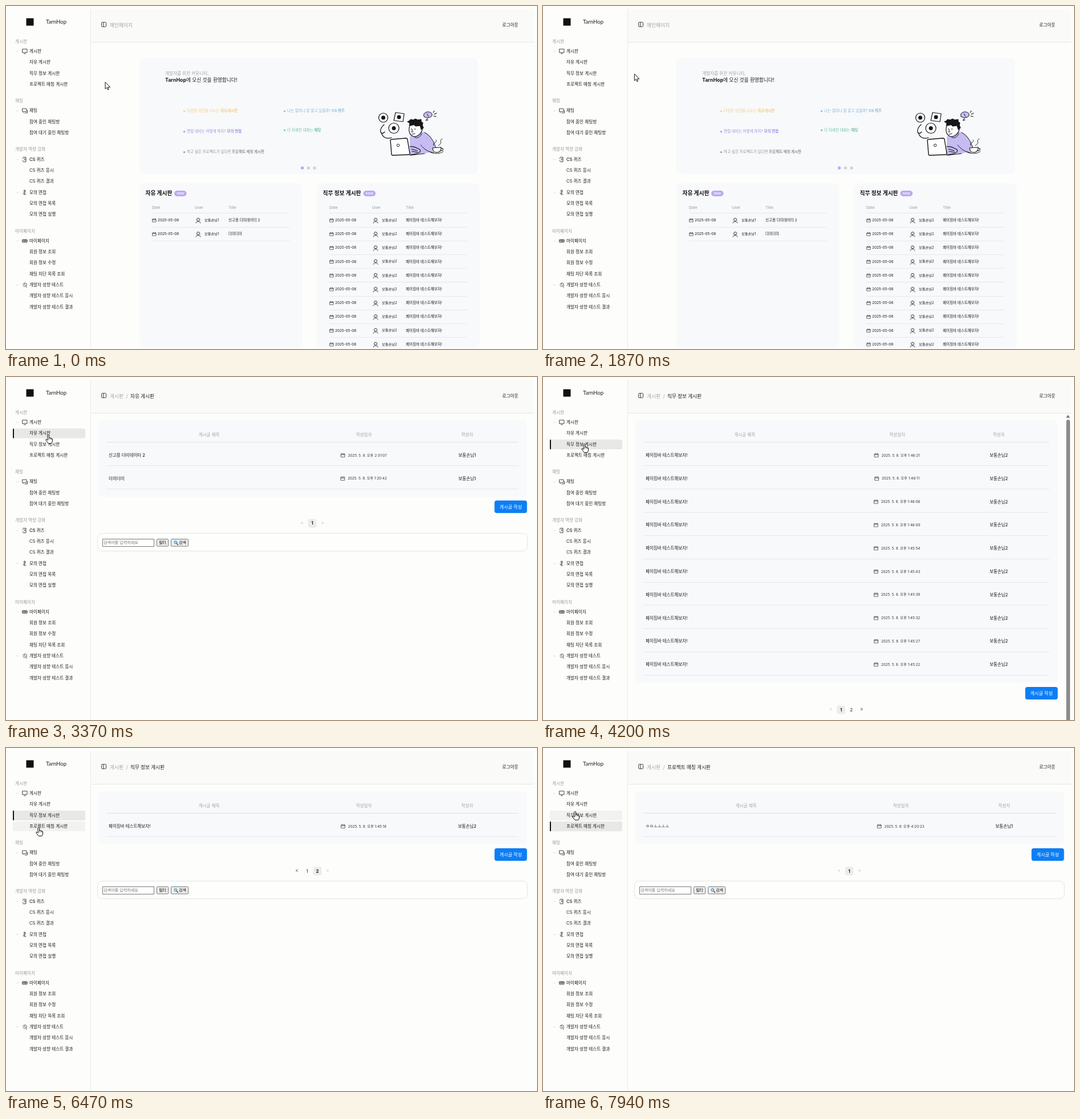
Recreate the animation shown at these times as an HTML page with a canvas. Size 931 by 602 pixels, loop 8 s.

```html
<!DOCTYPE html>
<html lang="ko">
<head>
<meta charset="utf-8">
<title>TarnHop</title>
<style>
html, body { margin: 0; width: 100%; height: 100%; overflow: hidden; background: #fdfdfc; }
canvas { display: block; width: 931px; height: 602px; }
</style>
</head>
<body>
<canvas id="stage"></canvas>
<script>
const W = 931, H = 602, LOOP = 8000;
const canvas = document.getElementById('stage');
const dpr = window.devicePixelRatio || 1;
canvas.width = W * dpr;
canvas.height = H * dpr;
const ctx = canvas.getContext('2d');

const SANS = 'Inter, "Noto Sans CJK KR", "Noto Sans CJK", "Noto Sans", sans-serif';
const INK = '#1c1c1c', GRAY = '#a5a5a1', LINE = '#e4e8ef', PANEL = '#f7f9fb', LILAC = '#bcaaf0';
const BRAND = 'TarnHop', USER = '보통손님', TEST = '페이징바 테스트해보자!';

// Drawing helpers
function text(s, x, y, size, color = INK, weight = 400, align = 'left', family = SANS) {
  ctx.font = `${weight} ${size}px ${family}`;
  ctx.fillStyle = color;
  ctx.textAlign = align;
  ctx.fillText(s, x, y);
  return ctx.measureText(s).width;
}

function box(x, y, w, h, r, fill, stroke) {
  ctx.beginPath();
  ctx.roundRect(x, y, w, h, r);
  if (fill) { ctx.fillStyle = fill; ctx.fill(); }
  if (stroke) { ctx.strokeStyle = stroke; ctx.lineWidth = 1; ctx.stroke(); }
}

function dot(x, y, r, fill, stroke, width = 1) {
  ctx.beginPath();
  ctx.arc(x, y, r, 0, 7);
  if (fill) { ctx.fillStyle = fill; ctx.fill(); }
  if (stroke) { ctx.strokeStyle = stroke; ctx.lineWidth = width; ctx.stroke(); }
}

function shape(d, x, y, fill, stroke, width = 1) {
  const p = new Path2D(d);
  ctx.save();
  ctx.translate(x, y);
  ctx.lineCap = ctx.lineJoin = 'round';
  if (fill) { ctx.fillStyle = fill; ctx.fill(p); }
  if (stroke) { ctx.strokeStyle = stroke; ctx.lineWidth = width; ctx.stroke(p); }
  ctx.restore();
}

function rule(x1, x2, y, color = LINE) {
  ctx.fillStyle = color;
  ctx.fillRect(x1, Math.round(y), x2 - x1, 1);
}

function calendar(x, y, s) {
  shape(`M0 1H${s}V${s}H0ZM0 ${s * .4}H${s}M${s * .25} 0V1M${s * .75} 0V1`, x, y - s / 2, null, '#444', .8);
}

// Sidebar
const ICONS = {
  board: 'M0 0H8V6H0ZM2.5 8H5.5',
  chat: 'M0 0H7V5H3L1 6.5V5H0ZM8.5 3V7.5H4',
  quiz: 'M1 0H6V8H1M3 2.5H5M3 4.5H5M0 2H1M0 6H1',
  talk: 'M3 0H5V2.5H3ZM4 3V5L2 7.5H6M1 5H4',
  card: 'M0 1.5H8V6H0ZM0 3.5H8M2.7 1.5V6M5.4 1.5V6',
  trait: 'M1 3A3.2 3.2 0 1 1 5.5 6.5L7.5 8M3 2L5 5M1 5L4 7'
};
const MENU = [
  ['게시판', ['board', '게시판', '자유 게시판', '직무 정보 게시판', '프로젝트 매칭 게시판']],
  ['채팅', ['chat', '채팅', '참여 중인 채팅방', '참여 대기 중인 채팅방']],
  ['개발자 역량 강화', ['quiz', 'CS 퀴즈', 'CS 퀴즈 응시', 'CS 퀴즈 결과'],
    ['talk', '모의 면접', '모의 면접 목록', '모의 면접 실행']],
  ['마이페이지', ['card', '마이페이지', '회원 정보 조회', '회원 정보 수정', '채팅 차단 목록 조회'],
    ['trait', '개발자 성향 테스트', '개발자 성향 테스트 응시', '개발자 성향 테스트 결과']]
];
const rows = [];
let menuY = 62.5;
for (const [label, ...groups] of MENU) {
  rows.push({ label, y: menuY, kind: 'section' });
  menuY += 17.2;
  for (const [icon, head, ...items] of groups) {
    rows.push({ label: head, y: menuY, kind: 'group', icon });
    for (const label of items) rows.push({ label, y: menuY += 19.3, kind: 'item' });
    menuY += 19.3;
  }
  menuY += 10.1;
}

const rowAt = ([x, y]) =>
  x > 12 && x < 139 ? rows.find(r => r.kind === 'item' && Math.abs(r.y - y) < 8.8) : undefined;

function sidebar(active, hovered) {
  box(35.5, 21.5, 13, 13, 0, '#111');
  text(BRAND, 70, 28.5, 9.6, INK, 400, 'left', 'Lato, sans-serif');
  for (const r of rows) {
    const on = r.label === active && r.kind === 'item';
    if (on || r === hovered) box(12, r.y - 8.6, 127, 17.2, 3, on ? '#e8e8e7' : '#f2f2f0');
    if (on) box(12, r.y - 8.6, 2, 17.2, 1, '#111');
    if (r.kind === 'section') text(r.label, 16, r.y, 7.6, '#9b9b98');
    else text(r.label, 41, r.y, 7.6, INK, r.kind === 'group' || on ? 500 : 400);
    if (r.icon) {
      shape('M0 0L2 2L4 0', 18, r.y - 1, null, '#d5d5d5', .8);
      shape(ICONS[r.icon], 29, r.y - 4, null, '#333', .9);
    }
  }
}

function header(active) {
  box(149, 5, 777, 58, 0, '#fafaf8');
  rule(149, 926, 62.5, '#e6e6e2');
  ctx.fillStyle = '#e9e9ea';
  ctx.fillRect(148, 5, 1, 597);
  box(167.5, 28.5, 8, 8, 1, null, '#444');
  shape('M0 0V8', 170.5, 28.5, null, '#444');
  if (active) {
    text('게시판', 182, 34, 8.7, GRAY);
    text('/', 212, 34, 8.7, GRAY, 400, 'center');
    text(active, 218, 34, 8.6, INK, 500);
  } else text('메인페이지', 182, 34, 8.7, GRAY);
  text('로그아웃', 870, 33.5, 7.6, INK, 500);
}

// Main page
const TIPS = [
  [311, 184.5, '#f4cb7c', '다양한 의견을 나누는 ', '자유게시판'],
  [311, 220.5, '#9c8de0', '면접 대비는 어떻게 하지? ', '모의 면접'],
  [311, 256.5, '#92929a', '하고 싶은 프로젝트가 있다면 ', '프로젝트 매칭 게시판'],
  [487, 184.5, '#82b8d8', '나는 얼마나 잘 알고 있을까? ', 'CS 퀴즈'],
  [487, 218, '#6cc2a2', '더 자세한 대화는 ', '채팅']
];

function drawing() {
  const pen = (d, fill, w = 1.2) => shape(d, 0, 0, fill, '#161616', w);
  // floating cards
  dot(661.5, 196, 8, '#fff', '#161616', 1.2);
  dot(661.5, 196, 3.5, '#161616');
  pen('M683 187L698 189L696 203L680 201Z', '#fff');
  dot(689, 195, 3.5, '#161616');
  dot(680, 214.5, 9, '#fff', '#161616', 1.2);
  dot(680, 214.5, 3.5, '#161616');
  pen('M663 208C653 217 656 229 664 221M658 222C660 231 668 234 676 231');
  // idea bulb
  pen('M733 194C729 185 745 183 747 190C748 196 738 198 733 194ZM739 197L736 201L740 200M738 189L741 194', '#c9bdf3', 1);
  pen('M749 187L751 184M751 190L755 188M750 193L754 194', null, 1.1);
  // body and head
  shape('M708 230C714 221 724 220 733 221C746 226 751 240 754 252C741 260 722 260 708 260Z', 0, 0, '#c6bcf2');
  pen('M734 222C746 228 752 242 755 253M727 244C734 252 741 257 750 257', null, 1);
  pen('M708 210C705 218 707 227 715 229C721 230 728 225 730 216L729 206Z', '#fff');
  pen('M704 203L708 201L709 199L714 200L718 198L722 200L728 199L728 203L731 205L730 209L732 214L728 217L726 210L718 211L715 208L707 210L708 206Z', '#161616', 1);
  pen('M711 215V217M717 215V217M713 217L711 221L714 221M712 225L717 224M716 230C721 234 727 229 729 224', null, 1);
  // laptop and hands
  pen('M674 236Q674 234 677 234L701 232Q704 232 704 235L708 259Q708 261 705 261L678 262Q676 262 676 260Z', '#fff', 1.4);
  dot(687.5, 244.5, 2.2, null, '#161616');
  pen('M708 247C714 245 720 249 726 252C728 256 724 260 709 261M711 251L721 254M712 255L722 257M708 262L734 259', null, 1.1);
  // cup
  pen('M748 249L763 248C763 255 759 257 755 257C751 257 748 254 748 249ZM763 250C768 249 767 254 762 254', '#fff', 1.1);
  pen('M743 256C748 260 763 260 767 255M750 245C746 239 758 240 754 235M758 245C768 239 757 237 765 233', null, .9);
}

function listCard(x, title, pillX, posts) {
  box(x, 311, 285.5, 289, 10, PANEL);
  text(title, x + 10.5, 329.5, 9.7, '#111', 700);
  box(pillX, 324, 21.5, 10, 5, LILAC);
  text('new', pillX + 10.7, 329.2, 6.5, '#fff', 500, 'center');
  const left = x + 22;
  ['Date', 'User', 'Title'].forEach((s, i) => text(s, left + [0, 75, 134][i], 354.5, 6.6, '#a3a3a6', 500));
  rule(left, left + 241, 363);
  posts.forEach(([title, user], i) => {
    const y = 376 + i * 24.2;
    calendar(left + 1, y, 6);
    text('2025-05-08', left + 10, y, 6.4);
    dot(left + 81, y, 5.3, '#eceef2');
    dot(left + 81, y - 1, 2.5, null, '#333', .9);
    shape('M-4 0C-3 -4 3 -4 4 0', left + 81, y + 5, null, '#333', .9);
    text(user, left + 92, y, 6.2, INK);
    text(title, left + 134, y, 6.5, INK);
    if (y < 590) rule(left, left + 241, y + 11.5);
  });
}

function mainPage() {
  box(233.5, 91, 594, 204, 10, PANEL);
  text('개발자를 위한 커뮤니티,', 279, 118.5, 7.6, '#a3a3a3');
  const w = text(BRAND, 279, 130, 8.8, INK, 700);
  text('에 오신 것을 환영합니다!', 279 + w, 130, 8.7, INK, 500);
  for (const [x, y, color, lead, bold] of TIPS) {
    dot(x + 1.5, y, 1.5, color);
    const lw = text(lead, x + 6, y, 6.5, color);
    text(bold, x + 6 + lw, y, 6.5, color, 700);
  }
  [519.5, 530.5, 541].forEach((x, i) => dot(x, 284.3, 2.7, i ? '#d3d3d6' : LILAC));
  drawing();
  listCard(234, '자유 게시판', 295, [['신고용 더미데이터 2', USER + 1], ['더미더미', USER + 1]]);
  ctx.save();
  ctx.beginPath();
  ctx.rect(0, 0, W, 600);
  ctx.clip();
  listCard(545, '직무 정보 게시판', 626.5, Array(10).fill([TEST, USER + 2]));
  ctx.restore();
}

// Board pages
const FREE = '자유 게시판', JOB = '직무 정보 게시판', MATCH = '프로젝트 매칭 게시판';
const posts = (title, user, times) => times.split(' ').map(t => [title, user, '2025. 5. 8. 오후 ' + t]);
const freePosts = [
  ...posts('신고용 더미데이터 2', USER + 1, '2:31:07'),
  ...posts('더미더미', USER + 1, '1:20:42')
];
const jobPosts = posts(TEST, USER + 2,
  '1:46:21 1:46:11 1:46:06 1:46:00 1:45:54 1:45:43 1:45:39 1:45:32 1:45:27 1:45:22');
const jobLast = posts(TEST, USER + 2, '1:45:14');
const matchPosts = posts('ㅇㅇㅗㅗㅗㅗ', USER + 1, '4:20:23');

// start, menu entry, posts (null while loading), page count, current page
const SCENES = [
  [0, null],
  [2950, FREE, null, 1, 1],
  [3050, FREE, freePosts, 1, 1],
  [3950, JOB, null, 1, 1],
  [4050, JOB, jobPosts, 2, 1],
  [5370, JOB, null, 2, 1],
  [5480, JOB, jobLast, 2, 2],
  [7150, MATCH, null, 1, 1],
  [7250, MATCH, matchPosts, 1, 1]
];

function searchBar(y, right) {
  box(160.5, y + .5, right - 160, 31, 8, '#fefefd', '#e4e4df');
  box(169.5, y + 10.5, 90, 13, 0, '#fff', '#777');
  text('검색어를 입력하세요', 171, y + 16.5, 7.1, '#777');
  box(264.5, y + 10.5, 20, 12.5, 1, '#efefef', '#777');
  text('필터', 274.5, y + 17, 7.1, '#111', 400, 'center');
  box(289.5, y + 10.5, 30, 12.5, 1, '#efefef', '#777');
  shape('M2 2L4.5 4.5', 297, y + 16, null, '#444', 1.4);
  dot(297.3, y + 16, 2.4, '#a8dcf4', '#2f78a8', .9);
  text('검색', 303, y + 17, 7.1, '#111');
}

function boardPage(list, pages, page, hoverNext) {
  const scroll = list && list.length > 5;
  const right = scroll ? 902.5 : 913.5;
  const cols = scroll ? [353.5, 621, 799] : [356, 627.5, 808.5];
  const bottom = list ? 128 + list.length * 40.9 : 146;
  box(161.5, 76, right - 161.5, bottom - 76, 8, PANEL);
  ['게시글 제목', '작성일자', '작성자'].forEach((s, i) => text(s, cols[i], 102, 7.5, GRAY, 400, 'center'));
  rule(176, right - 15, 113.5, '#dde2ea');
  if (!list) text('로딩 중입니다...', 175, 126.5, 8.6, INK);
  else list.forEach(([title, user, date], i) => {
    const y = 137.7 + i * 40.8;
    text(title, 180, y, 7.5, INK, 500);
    ctx.font = `400 6.3px ${SANS}`;
    const x = cols[1] - (ctx.measureText(date).width + 12) / 2;
    calendar(x, y - .5, 6.5);
    text(date, x + 12, y, 6.3, '#333');
    text(user, cols[2], y, 7.5, INK, 500, 'center');
    rule(176, right - 15, 155 + i * 40.9);
  });
  box(right - 57, bottom + 7, 57, 22, 4, '#0d7ef5');
  text('게시글 작성', right - 28.5, bottom + 18.3, 8.1, '#fff', 500, 'center');

  const py = bottom + 47, mid = scroll ? 531.7 : 537;
  for (let i = 0; i <= pages + 1; i++) {
    const x = mid + (i - (pages + 1) / 2) * 18;
    if (i === page || (hoverNext && i === page + 1)) box(x - 7.2, py - 7.5, 14.4, 15, 3, '#ececea');
    if (i > 0 && i <= pages) text(i, x, py + .3, 7.8, INK, i === page ? 700 : 400, 'center');
    else {
      const off = i ? page === pages : page === 1;
      text(i ? '>' : '<', x, py, 8, off ? '#bdbdbd' : '#222', 400, 'center');
    }
  }
  searchBar(Math.round(bottom + 64.5), right);
  if (scroll) {
    box(916, 64, 10, 538, 0, '#fbfbfb');
    shape('M0 5L3.5 0L7 5Z', 917, 66.5, '#777');
    box(917.5, 75, 6.5, 540, 3.2, '#8a8a8a');
  }
}

// Pointer
const PATH = [
  [0, 174, 134], [300, 174, 134], [900, 171, 133], [1300, 171, 133], [2500, 148, 104],
  [2600, 77, 101], [2900, 74, 100], [3300, 74, 100], [3800, 72, 117], [4350, 72, 117],
  [5250, 541, 584], [5550, 541, 584], [6350, 57, 139], [7250, 57, 139], [7850, 56, 111], [LOOP, 56, 111]
];

function pointerAt(t) {
  t = Math.max(0, t);
  let i = 1;
  while (i < PATH.length - 1 && PATH[i][0] < t) i++;
  const [t0, x0, y0] = PATH[i - 1], [t1, x1, y1] = PATH[i];
  const k = Math.min(1, (t - t0) / (t1 - t0)), e = k * k * (3 - 2 * k);
  return [x0 + (x1 - x0) * e, y0 + (y1 - y0) * e];
}

function pointer([x, y], hand) {
  if (hand) {
    shape('M-1 1Q0 -1 1.5 1V6L3 5.5L5 6.5L6.5 7L7.5 8V12L6 15.5H0L-4 10Q-4.5 8 -2.5 8.5L-1 10Z', x, y, '#fff', '#111', 1);
    shape('M1.5 6V8.5M4 6.5V8.5M6 7V9', x, y, null, '#111', .7);
  } else shape('M0 0V11.5L2.7 9L4.5 13L6.3 12.2L4.6 8.4H8.2Z', x, y, '#fff', '#111', 1);
}

function render(t) {
  ctx.setTransform(dpr, 0, 0, dpr, 0, 0);
  ctx.textBaseline = 'middle';
  ctx.fillStyle = '#fdfdfc';
  ctx.fillRect(0, 0, W, H);
  const [, active, list, pages, page] = SCENES.filter(s => s[0] <= t).pop();
  const pos = pointerAt(t), hovered = rowAt(pos);
  const overNext = pages === 2 && page === 1 && Math.hypot(pos[0] - 541, pos[1] - 584) < 8;
  header(active);
  sidebar(active, hovered);
  if (active) boardPage(list, pages, page, overNext);
  else mainPage();
  const settled = hovered && rowAt(pointerAt(t - 120));
  pointer(pos, settled || (overNext && list));
}

const start = performance.now();
function tick() {
  render((performance.now() - start) % LOOP);
  requestAnimationFrame(tick);
}
tick();
</script>
</body>
</html>
```
